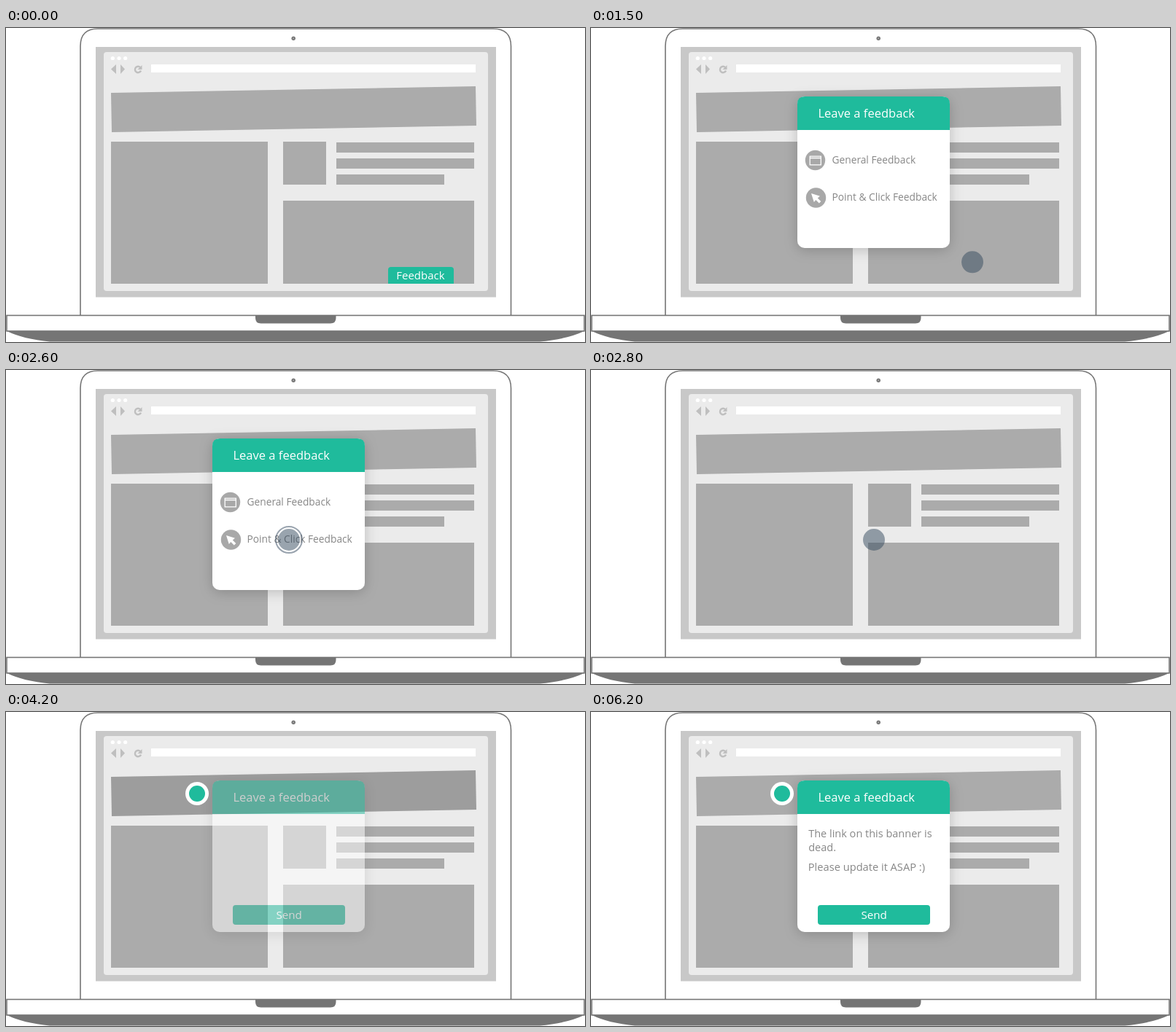
An HTML page for the animation above (8000 ms loop, 794x431 px).

```html
<!DOCTYPE html>
<html lang="en">
<head>
<meta charset="utf-8">
<title>Feedback widget</title>
<style>
  html, body { margin: 0; width: 100%; height: 100%; overflow: hidden; background: #fff; }
  svg { display: block; width: 794px; height: 431px; font-family: "Open Sans", "Noto Sans", sans-serif; }
  .line { fill: #fff; stroke: #757575; stroke-width: 1.6; }
  .dark { fill: #757575; }
  .block { fill: #ababab; }
  .teal { fill: #1fbb9c; }
  .white { fill: #fff; }
  .icon { fill: #a8a8a8; }
  .chrome { fill: #bfbfbf; }
  .copy { fill: #878787; }
</style>
</head>
<body>
<svg viewBox="0 0 794 431">
  <defs>
    <filter id="shadow" x="-30%" y="-30%" width="160%" height="160%">
      <feDropShadow dx="0" dy="3" stdDeviation="9" flood-opacity=".2"/>
    </filter>
  </defs>

  <!-- laptop -->
  <path class="line" d="M102 394V25Q102 1 126 1H668Q692.500 1 692.500 25V394"/>
  <circle cx="394.200" cy="14.300" r="2.700" class="dark"/>
  <circle cx="394.200" cy="14.300" r="1" fill="#aaa"/>
  <path class="dark" d="M1 416H793Q770 427 732 430.500H60Q24 427 1 416Z"/>
  <rect class="line" x="1" y="394.500" width="792" height="21.500"/>
  <path class="dark" d="M342 394H452.500V398Q452.500 405.500 445 405.500H349.500Q342 405.500 342 398Z"/>

  <!-- browser -->
  <rect x="123" y="26" width="549" height="343.500" fill="#c8c8c8"/>
  <rect x="134" y="33" width="527" height="328" rx="4" fill="#ebebeb"/>
  <g class="white">
    <circle cx="146.300" cy="41.500" r="2.600"/>
    <circle cx="155" cy="41.500" r="2.600"/>
    <circle cx="163.700" cy="41.500" r="2.600"/>
    <rect x="199" y="50" width="445" height="11"/>
  </g>
  <path class="chrome" d="M144 56.500L151 50V63ZM163 56.500L157 50V63ZM186.500 51V57H180.500Z"/>
  <path d="M184.500 54.500A4.200 4.200 0 1 0 185 58.500" fill="none" stroke="#bfbfbf" stroke-width="2.400"/>

  <!-- page -->
  <path id="banner" d="M144 89L644 80L645 134L145 143Z"/>
  <g class="block">
    <rect x="144" y="156" width="215" height="195"/>
    <rect x="380" y="156" width="59" height="59"/>
    <rect x="453" y="157" width="189" height="14"/>
    <rect x="453" y="179" width="189" height="14"/>
    <rect x="453" y="201" width="148" height="14"/>
    <rect x="380" y="237" width="262" height="114"/>
  </g>
  <g id="tab">
    <path class="teal" d="M524 351V332Q524 328 528 328H610Q614 328 614 332V351Z"/>
    <text class="white" x="535.300" y="345" font-size="15">Feedback</text>
  </g>

  <!-- popup -->
  <g id="popup">
    <rect class="white" x="283" y="94" width="209" height="208" rx="10" filter="url(#shadow)"/>
    <path class="teal" d="M283 140V104Q283 94 293 94H482Q492 94 492 104V140Z"/>
    <text class="white" x="311.400" y="123" font-size="16.550">Leave a feedback</text>
    <g id="menu">
      <circle class="icon" cx="307.500" cy="181.500" r="13.700"/>
      <path d="M300.200 176.200H315.300V187.800H300.200ZM300 178.500H315.500" fill="none" stroke="#fff" stroke-width="1.300"/>
      <circle class="icon" cx="308.500" cy="233" r="13.700"/>
      <path class="white" d="M302 227L314 230.800L310.800 233.500L315.300 238L312.800 240.400L308.300 236L305.800 239Z"/>
      <g class="copy" font-size="13.760">
        <text x="330.500" y="186">General Feedback</text>
        <text x="330.500" y="237">Point &amp; Click Feedback</text>
      </g>
    </g>
    <g id="form">
      <g id="message" class="copy" font-size="14.500">
        <text x="298.200" y="172.300"></text>
        <text x="298.200" y="191.300"></text>
        <text x="297.800" y="218.300" font-size="14.650"></text>
      </g>
      <rect class="teal" x="311" y="265" width="154" height="27" rx="4"/>
      <text class="white" x="388.200" y="284" font-size="15.200" text-anchor="middle">Send</text>
    </g>
  </g>

  <!-- pointers -->
  <g id="cursor" fill="#34495e">
    <circle r="15" fill-opacity=".5"/>
    <circle id="ring" fill="none" stroke="#34495e" stroke-opacity=".5" stroke-width="2"/>
  </g>
  <g id="marker">
    <circle class="white" r="16"/>
    <circle class="teal" r="11"/>
  </g>
</svg>
<script>
const LOOP = 8000, STEP = 100;
const $ = id => document.getElementById(id);
const lines = $('message').children;
const typed = [
  [0, 'The link'], [0, ' on this'], [0, ' banner is'], [1, 'dead.'],
  [2, 'Pleas'], [2, 'e upd'], [2, 'ate it'], [2, ' ASAP :)']
];
const entry = [565, 357], tabSpot = [550, 339], menuSpot = [388, 233], bannerSpot = [262, 112];

const fade = (id, value) => $(id).setAttribute('opacity', value);
const mix = (a, b, k) => a.map((v, i) => v + (b[i] - v) * k);
const place = (id, point) => $(id).setAttribute('transform', `translate(${point})`);

function draw(time) {
  const n = Math.floor(time % LOOP / STEP);
  // Progress of a stepped move whose first change happens at step `first`.
  const ramp = (first, count) => Math.max(0, Math.min(1, (n - first + 1) / count));

  const menu = ramp(9, 2) - ramp(27, 2);
  const form = ramp(42, 2);
  fade('tab', 1 - ramp(9, 2));
  fade('popup', menu + form);
  fade('menu', n < 40 ? 1 : 0);
  fade('form', n < 40 ? 0 : 1);

  const shade = 171 - 28 * (ramp(38, 4) - form);
  $('banner').setAttribute('fill', `rgb(${shade},${shade},${shade})`);

  const arrive = ramp(5, 3);
  place('cursor', n < 15 ? mix(entry, tabSpot, arrive) : mix(tabSpot, menuSpot, ramp(15, 6)));
  fade('cursor', n < 33 ? arrive : 0);
  $('ring').setAttribute('r', n === 7 || n === 25 ? 16.5 : n === 8 || n === 26 ? 18 : 0);

  place('marker', mix(menuSpot, bannerSpot, ramp(33, 5)));
  fade('marker', n < 33 ? 0 : 1);

  const shown = typed.slice(0, Math.max(0, Math.floor((n - 46) / 2)));
  [...lines].forEach((line, i) => {
    line.textContent = shown.filter(([row]) => row === i).map(([, chunk]) => chunk).join('');
  });
}

const start = performance.now();
(function tick() {
  draw(performance.now() - start);
  requestAnimationFrame(tick);
})();
</script>
</body>
</html>
```
